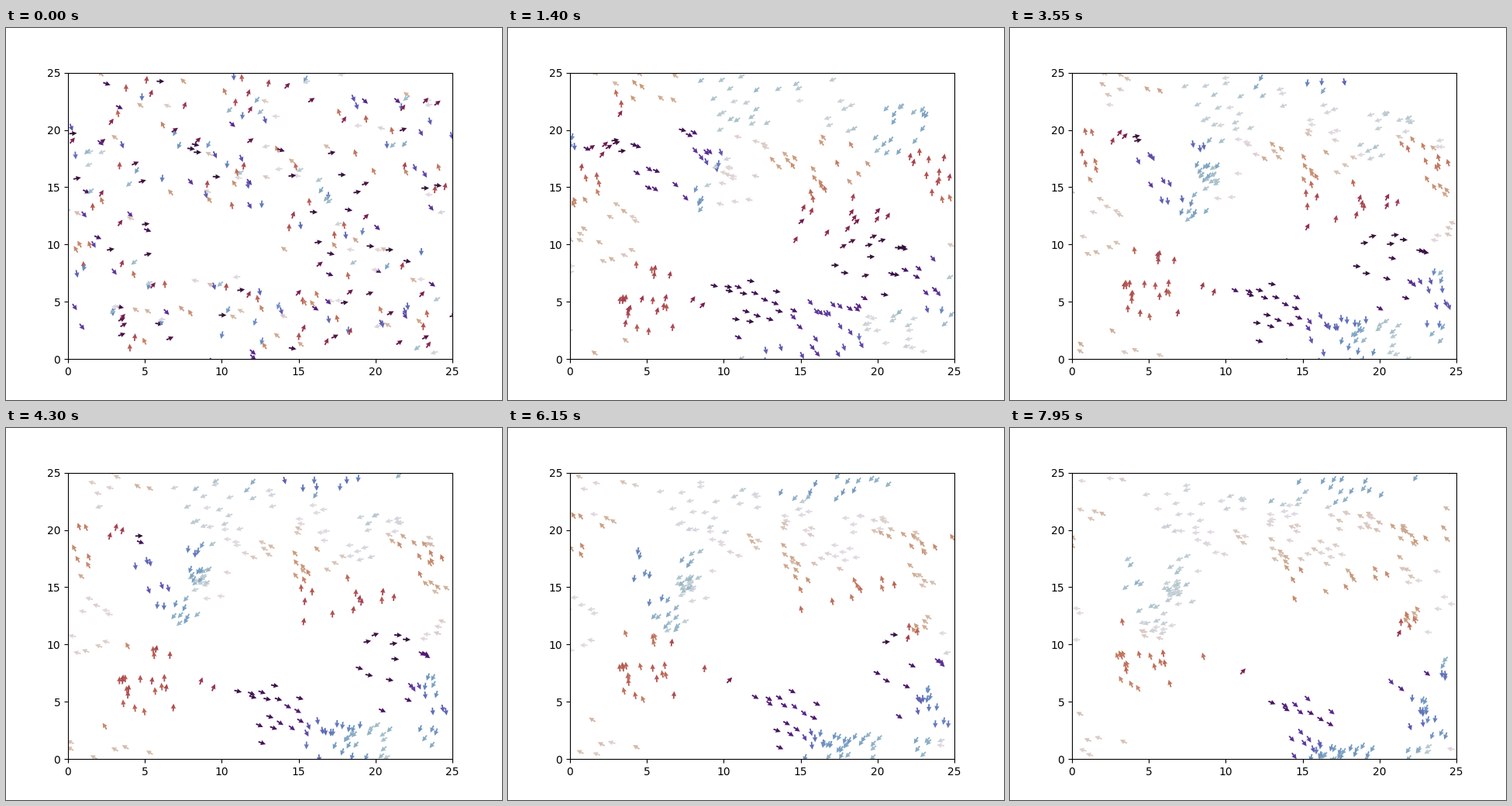
Recreate the animation shown at these times as a matplotlib script. Size 640 by 480 pixels, loop 8 s.

```python
import matplotlib.pyplot as plt
import numpy as np
from matplotlib.animation import FuncAnimation

SIZE = 25
COUNT = 300
STEPS = 160
SPEED = 0.03
NOISE = 0.15   # largest random turn per step
RADIUS = 1     # neighbours within this distance align
PULL = 0.25    # how strongly the streams steer
REACH = 3.2    # particles start within this distance of a stream

# Streams: x, y, heading in degrees at the start and at the end
STREAMS = np.array([
    (5, 23, 135, 165), (12, 23.5, 215, 185), (17, 22.5, 205, 175),
    (22.5, 21, 240, 160), (5, 18.5, -10, -140), (7.5, 17, -30, -140),
    (11.5, 16, 160, 188), (17, 15.5, 120, 158), (24.5, 16, 75, 135),
    (17, 11, 45, 130), (18, 8.5, 8, -40), (23, 7, -40, -115),
    (23, 3, 185, 240), (15.5, 3, -45, -130), (11, 5, -8, -35),
    (5, 4, 75, 106), (2.5, 10.5, 145, 182),
])

rng = np.random.default_rng(7)


def offsets(a, b):
    """Shortest vectors between two sets of points in the periodic box."""
    gap = a[:, None] - b[None]
    return gap - SIZE * np.round(gap / SIZE)


def start_points():
    pts = rng.uniform(0, SIZE, (3 * COUNT, 2))
    dist = np.linalg.norm(offsets(pts, STREAMS[:, :2]), axis=-1)
    return pts[dist.min(axis=1) < REACH][:COUNT]


def simulate():
    pos = start_points()
    dist = np.linalg.norm(offsets(pos, STREAMS[:, :2]), axis=-1)
    share = np.exp(-dist ** 2 / 3)
    share /= share.sum(axis=1, keepdims=True)
    first, last = np.exp(1j * np.radians(STREAMS[:, 2:])).T
    first, last = np.angle(share @ first), np.angle(share @ last)
    turn = np.angle(np.exp(1j * (last - first)))

    angle = rng.uniform(-np.pi, np.pi, COUNT)
    track = []
    for t in range(STEPS):
        track.append((pos, angle))
        near = np.linalg.norm(offsets(pos, pos), axis=-1) < RADIUS
        mean = near @ np.exp(1j * angle) / near.sum(axis=1)
        goal = np.exp(1j * (first + turn * t / STEPS))
        angle = np.angle(mean + PULL * goal)
        angle += rng.uniform(-NOISE, NOISE, COUNT)
        angle = np.angle(np.exp(1j * angle))
        step = SPEED * np.column_stack([np.cos(angle), np.sin(angle)])
        pos = (pos + step) % SIZE
    return track


track = simulate()
pos, angle = track[0]

fig, ax = plt.subplots(figsize=(6.4, 4.8), dpi=100)
ax.set_xlim(0, SIZE)
ax.set_ylim(0, SIZE)
arrows = ax.quiver(pos[:, 0], pos[:, 1], np.cos(angle), np.sin(angle), angle,
                   cmap="twilight", clim=(-np.pi, np.pi), scale=50,
                   width=0.0037, headwidth=3.5, headlength=3.5,
                   headaxislength=3.3)


def draw(t):
    pos, angle = track[t]
    arrows.set_offsets(pos)
    arrows.set_UVC(np.cos(angle), np.sin(angle), angle)
    return (arrows,)


anim = FuncAnimation(fig, draw, frames=STEPS, interval=50,
                     repeat=True, repeat_delay=0)
plt.show()
```
